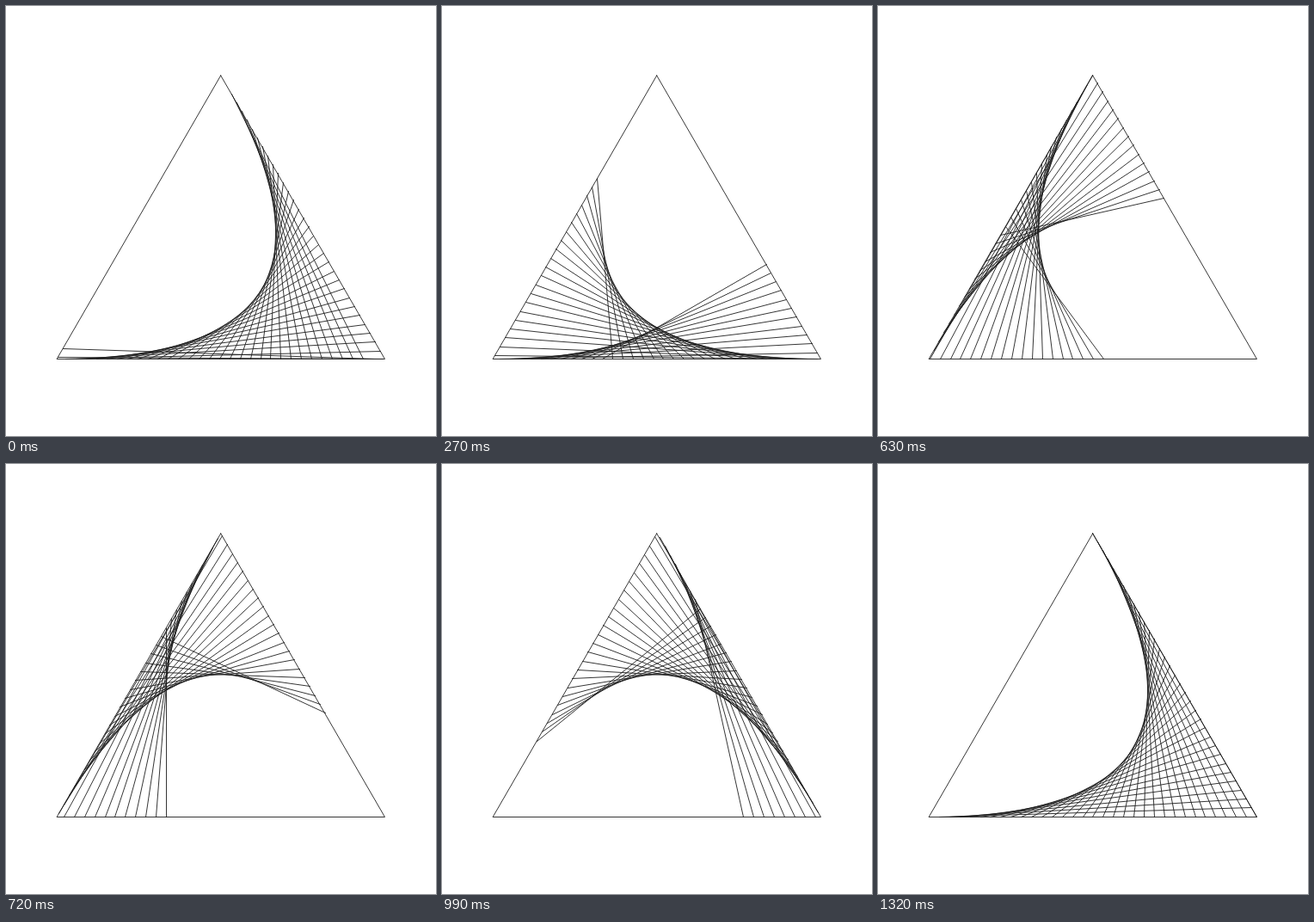
Recreate the animation shown at these times as an HTML page with a canvas. Size 500 by 500 pixels, loop 1.35 s.

```html
<!DOCTYPE html>
<html lang="en">
<head>
<meta charset="utf-8">
<title>String triangle</title>
<style>
  html, body { margin: 0; height: 100%; overflow: hidden; background: #fff; }
  canvas { display: block; }
</style>
</head>
<body>
<canvas id="stage" width="500" height="500"></canvas>
<script>
const ctx = document.getElementById('stage').getContext('2d');
const LINES = 32, STEP_MS = 30, STEPS = 45;
// The tiny offsets keep the corners on a definite side of the pixel grid.
const RADIUS = 220, CENTER = { x: 250 - 1e-4, y: 300 + 1e-4 };

const corners = [0, 1, 2].map(i => {
  const angle = i * 2 * Math.PI / 3 - Math.PI / 2;
  return [CENTER.x + RADIUS * Math.cos(angle), CENTER.y + RADIUS * Math.sin(angle)];
});

const snap = v => Math.floor(v) + 0.5;

// Point on the outline, snapped to a pixel centre.
// One unit of u is one edge, clockwise from the top.
function pointAt(u) {
  const edge = Math.floor(u), f = u - edge;
  const [ax, ay] = corners[edge % 3], [bx, by] = corners[(edge + 1) % 3];
  return [snap(ax + (bx - ax) * f), snap(ay + (by - ay) * f)];
}

function draw(now) {
  const step = Math.floor(now / STEP_MS) % STEPS;
  const start = (step + 1) * 3 / STEPS;

  ctx.fillStyle = '#fff';
  ctx.fillRect(0, 0, 500, 500);
  ctx.strokeStyle = '#202020';
  ctx.lineWidth = 0.9;
  ctx.lineCap = 'round';

  ctx.beginPath();
  for (let i = 0; i < 3; i++) ctx.lineTo(...pointAt(i));
  ctx.closePath();
  ctx.stroke();

  // Each chord joins two outline points exactly one edge length apart.
  for (let i = 0; i < LINES; i++) {
    const u = start + i / LINES;
    ctx.beginPath();
    ctx.moveTo(...pointAt(u));
    ctx.lineTo(...pointAt(u + 1));
    ctx.stroke();
  }
}

const t0 = performance.now();
function tick() {
  draw(performance.now() - t0);
  requestAnimationFrame(tick);
}
tick();
</script>
</body>
</html>
```
